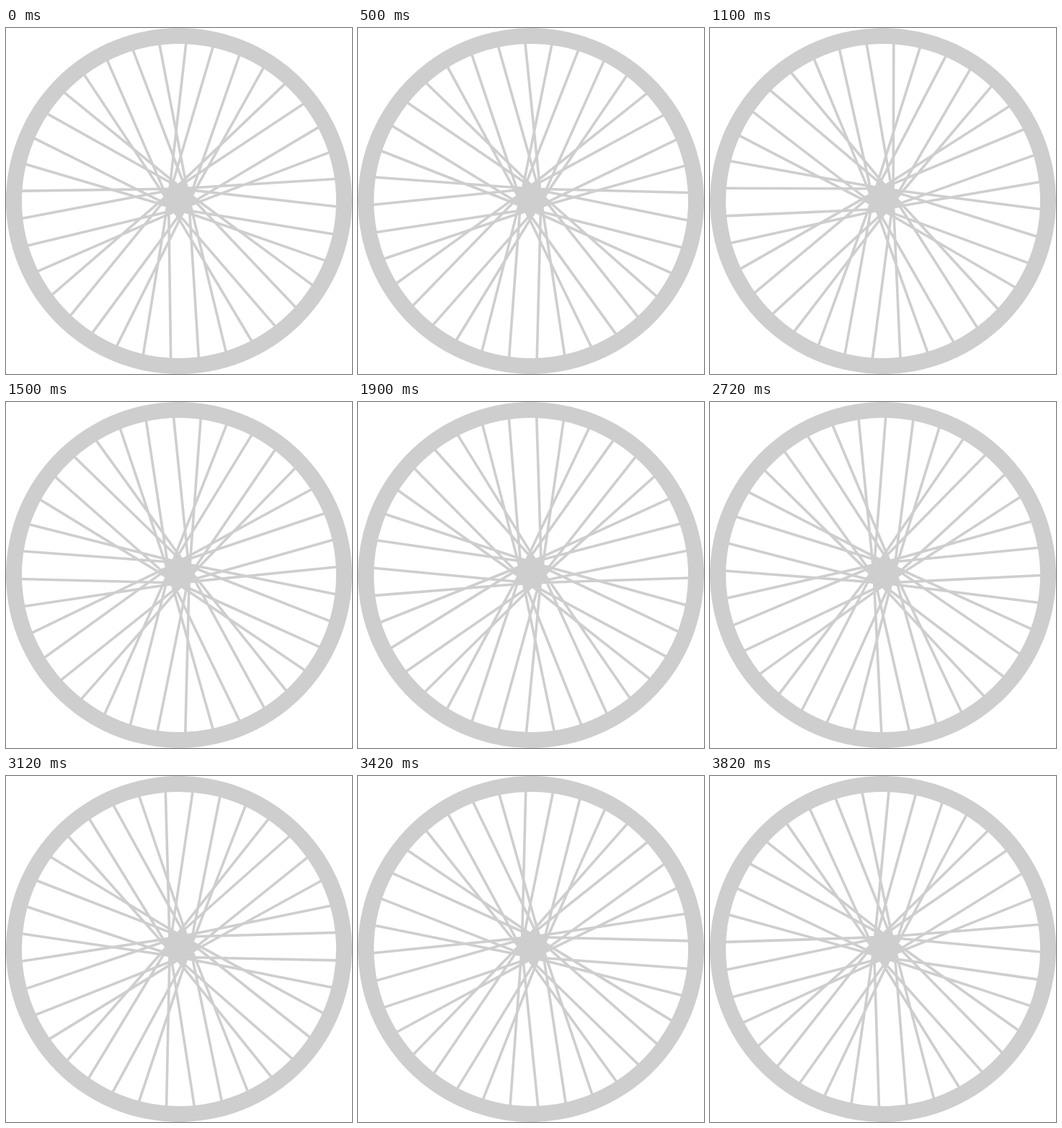
Animation of 480 by 480 pixels, one loop 3920 ms. Source, as an HTML page:

```html
<!DOCTYPE html>
<html lang="en">
<head>
<meta charset="utf-8">
<title>Bicycle wheel</title>
<style>
  html, body { margin: 0; width: 100%; height: 100%; overflow: hidden; background: #fff; }
  svg { display: block; width: 100vw; height: 100vh; }
</style>
</head>
<body>
<svg viewBox="-240 -240 480 480" fill="none" stroke="#cecece">
  <g id="wheel">
    <g transform="translate(-0.45 -3)">
      <path id="spokes" stroke-width="3.6"/>
      <circle r="21" fill="#cecece" stroke="none"/>
    </g>
    <circle r="229" stroke-width="22"/>
  </g>
</svg>
<script>
const LOOP = 3920, STEP = 100, SHORT_STEP = 20, SHORT_INDEX = 22;
const SPOKES = 36, RIM = 222, TANGENT = 14, START = 2.82;
const wheel = document.getElementById('wheel');

// Point at a clockwise angle from the top, in degrees.
function polar(radius, degrees) {
  const a = degrees * Math.PI / 180;
  return `${radius * Math.sin(a)} ${-radius * Math.cos(a)}`;
}

// Spokes touch a small hub circle: two lean back, two lean forward, and so on.
function spokePath() {
  const spread = Math.acos(TANGENT / RIM) * 180 / Math.PI;
  let path = '';
  for (let i = 0; i < SPOKES; i++) {
    const lean = i % 4 < 2 ? -1 : 1;
    const angle = START + i * 360 / SPOKES;
    path += `M${polar(RIM, angle)}L${polar(TANGENT, angle + lean * spread)}`;
  }
  return path;
}

// A single step in the loop is shorter than the rest.
function stepAt(time) {
  const shortStart = SHORT_INDEX * STEP;
  if (time < shortStart) return Math.floor(time / STEP);
  if (time < shortStart + SHORT_STEP) return SHORT_INDEX;
  return SHORT_INDEX + 1 + Math.floor((time - shortStart - SHORT_STEP) / STEP);
}

document.getElementById('spokes').setAttribute('d', spokePath());

// The hub sits slightly off centre, so the whole wheel turns one degree per step.
const start = performance.now();
function draw() {
  const step = stepAt((performance.now() - start) % LOOP);
  wheel.setAttribute('transform', `rotate(${step})`);
  requestAnimationFrame(draw);
}
draw();
</script>
</body>
</html>
```
